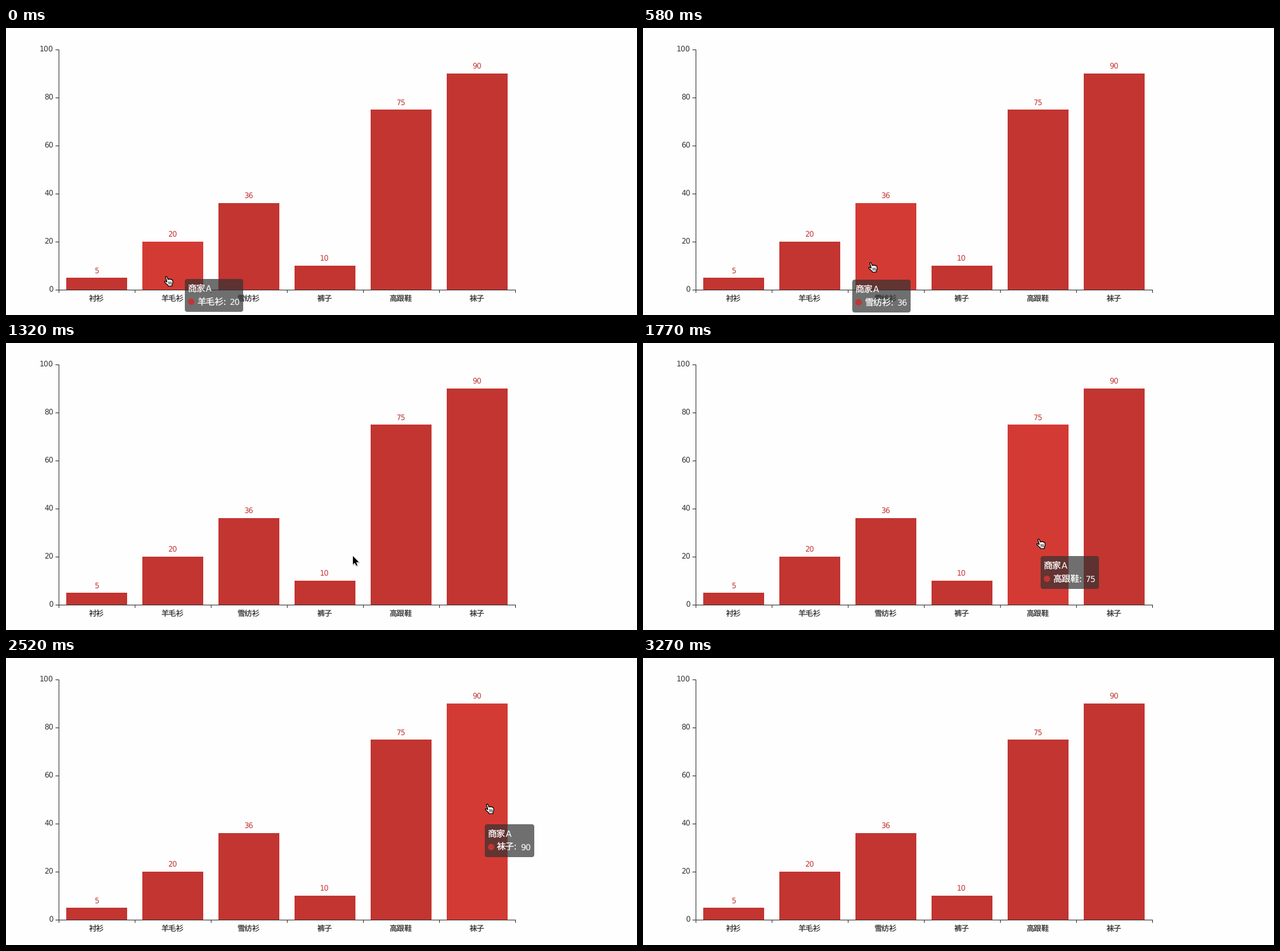
These frames come from a looping animation (995 px wide and 454 px high, 4.23 s). A matplotlib script:

```python
import numpy as np
import matplotlib.pyplot as plt
from matplotlib.animation import FuncAnimation
from matplotlib.patches import Circle, FancyBboxPatch, Polygon, Rectangle
from matplotlib.transforms import Affine2D

W, H, DPI = 995, 454, 64
PT = 72 / DPI  # points per pixel
INTERVAL, LOOP = 30, 4230
FRAMES_PER_STEP = 5

RED, LIFTED, INK, PAPER = "#c23531", "#d43a34", "#333333", "#fefefe"
LATIN, CJK = "DejaVu Sans", "Noto Sans CJK JP"

NAMES = ["衬衫", "羊毛衫", "雪纺衫", "裤子", "高跟鞋", "袜子"]
VALUES = [5, 20, 36, 10, 75, 90]
LEFT, BASE, SLOT, GAP, BAR_W, UNIT = 83, 414, 120, 12, 96, 3.8

# Pointer path: step, x, y at its turns; it leaves after the last one.
PATH = np.array([
    (-1, 258, 375), (0, 249, 392), (3, 301, 378), (4, 355, 370),
    (6, 460, 346), (9, 546, 336), (10, 581, 325), (12, 620, 309),
    (14, 649, 280), (15, 700, 257), (17, 755, 230), (18, 757, 228),
    (19, 767, 249), (21, 927, 419),
])
LAST_STEP = PATH[-1, 0] + 1
HOTSPOT = np.array([5, 1])
TIP_OFFSET = HOTSPOT + 20
REACTION = .25  # steps until the chart notices the pointer
GLIDE = .08     # share of the way to a new place the tooltip has covered

plt.rcParams["text.hinting"] = "none"
fig = plt.figure(figsize=(W / DPI, H / DPI), dpi=DPI, facecolor=PAPER)
ax = fig.add_axes([0, 0, 1, 1])
ax.set(xlim=(0, W), ylim=(H, 0))
ax.axis("off")


def pointer_at(step):
    steps, xs, ys = PATH.T
    return np.array([np.interp(step, steps, xs), np.interp(step, steps, ys)])


def bar_top(i):
    return round(BASE - VALUES[i] * UNIT)


def bar_under(pointer):
    x, y = pointer + HOTSPOT
    i, inside = divmod(x - LEFT, SLOT)
    i = int(i)
    hit = (0 <= i < len(VALUES) and GAP <= inside < GAP + BAR_W
           and bar_top(i) <= y < BASE)
    return i if hit else None


def plan_steps():
    """Pointer, highlighted bar, tooltip item and tooltip place per step."""
    plan, item, before = [], None, None
    aim = pointer_at(-1) + TIP_OFFSET
    for step in range(LAST_STEP):
        pointer = pointer_at(step)
        hover = bar_under(pointer_at(step - REACTION))
        place = aim
        if bar_under(pointer) is not None:
            new_aim = pointer + TIP_OFFSET
            place = aim + GLIDE * (new_aim - aim)
            aim = new_aim
        if hover is not None:
            item = hover
        # The tooltip lingers for one step after a bar is left.
        shown = hover is not None or before is not None
        plan.append((np.round(pointer), hover, item if shown else None,
                     np.round(place)))
        before = hover
    return plan + [(None, None, None, None)]


def label(x, y, text, px, color=INK, font=LATIN, ha="center", **kw):
    return ax.text(x, y, text, fontsize=px * PT, color=color, family=font,
                   ha=ha, va="baseline", **kw)


def rule(xs, ys):
    ax.plot(xs, ys, color=INK, lw=PT, snap=False, solid_capstyle="butt",
            zorder=1)


def draw_axes():
    right = LEFT + SLOT * len(NAMES)
    rule([LEFT, right + 1], [BASE + .5] * 2)
    rule([LEFT + .5] * 2, [34, BASE + 1])
    for value in range(0, 101, 20):
        y = BASE - value * UNIT
        rule([LEFT - 5, LEFT], [y + .5] * 2)
        label(75, y + 4.2, str(value), 11.5, ha="right")
    for x in range(LEFT, right + 1, SLOT):
        rule([x + .5] * 2, [BASE, BASE + 5])


def draw_bar(i):
    x, top = LEFT + GAP + SLOT * i, bar_top(i)
    bar = Rectangle((x, top), BAR_W, BASE - top, fc=RED, lw=0, snap=False,
                    zorder=2)
    ax.add_patch(bar)
    middle = x + BAR_W / 2 - .5
    label(middle, top - 7, str(VALUES[i]), 11.5, RED)
    label(middle, 432, NAMES[i], 12, font=CJK)
    return bar


draw_axes()
bars = [draw_bar(i) for i in range(len(NAMES))]

# Tooltip parts are laid out from its own top left corner.
tip_shift = Affine2D()
tip_space = tip_shift + ax.transData
tip_box = FancyBboxPatch((0, 0), 92, 52, fc=(.196, .196, .196, .7), lw=0,
                         boxstyle="round,pad=0,rounding_size=4",
                         transform=tip_space, zorder=5)
tip_dot = Circle((10, 36), 5, fc=RED, lw=0, transform=tip_space, zorder=6)
for patch in (tip_box, tip_dot):
    ax.add_patch(patch)
tip_text = dict(color="white", transform=tip_space, zorder=6)
tip_name = label(19, 41, "", 14, font=CJK, ha="left", **tip_text)
tip_value = label(87, 41, "", 13, ha="right", **tip_text)
tip_parts = [
    tip_box, tip_dot, tip_name, tip_value,
    label(4, 20, "商家", 14, font=CJK, ha="left", **tip_text),
    label(33, 20, "A", 13.5, ha="left", **tip_text),
]

# Pointers: a white hand over bars, a black arrow elsewhere.
pointer_shift = Affine2D()
pointer_space = pointer_shift + ax.transData


def pointer_shape(points, z, **style):
    shape = Polygon(points, transform=pointer_space, zorder=z,
                    joinstyle="round", **style)
    return ax.add_patch(shape)


HAND = [(2.4, 2), (3.5, 1), (4.8, 1.7), (6.6, 5.9), (7.8, 4.9), (9, 5.7),
        (10.7, 5.1), (11.6, 6.2), (13, 6.2), (13.9, 7.6), (14.1, 11),
        (13, 13.5), (13, 16), (7, 16.3), (6, 14.5), (3, 12), (1, 9.7),
        (1.2, 8.6), (3, 8.6), (4.8, 10), (4.2, 7)]
ARROW = np.array([(1, 1), (1, 14.4), (4, 11.6), (6, 16.2), (8.1, 15.3),
                  (6.1, 10.8), (10.4, 10.6)])

hand = [pointer_shape(HAND, 8, fc="white", ec="black", lw=1.2 * PT)]
for x in (7.4, 9.3, 11.2):
    hand += ax.plot([x, x + .5], [9.6, 13.2], color="black", lw=.8 * PT,
                    transform=pointer_space, zorder=9)
arrow = [
    pointer_shape(ARROW + (.6, .9), 7, fc="black", ec="black", lw=2 * PT,
                  alpha=.22),
    pointer_shape(ARROW, 8, fc="white", ec="white", lw=1.6 * PT),
    pointer_shape(ARROW, 9, fc="black", lw=0),
]


def show(parts, visible):
    for part in parts:
        part.set_visible(visible)


PLAN = plan_steps()


def update(frame):
    step = min((frame + 1) // FRAMES_PER_STEP, LAST_STEP)
    pointer, hover, item, place = PLAN[step]

    for i, bar in enumerate(bars):
        bar.set_facecolor(LIFTED if i == hover else RED)

    show(hand, pointer is not None and hover is not None)
    show(arrow, pointer is not None and hover is None)
    if pointer is not None:
        pointer_shift.clear().translate(*pointer)

    show(tip_parts, item is not None)
    if item is not None:
        width = 50 + 14 * len(NAMES[item])
        tip_shift.clear().translate(*place)
        tip_box.set_width(width)
        tip_name.set_text(NAMES[item] + ":")
        tip_value.set_text(str(VALUES[item]))
        tip_value.set_x(width - 5)
    return [*bars, *tip_parts, *hand, *arrow]


anim = FuncAnimation(fig, update, frames=LOOP // INTERVAL, interval=INTERVAL,
                     repeat=True, repeat_delay=0)
plt.show()
```
